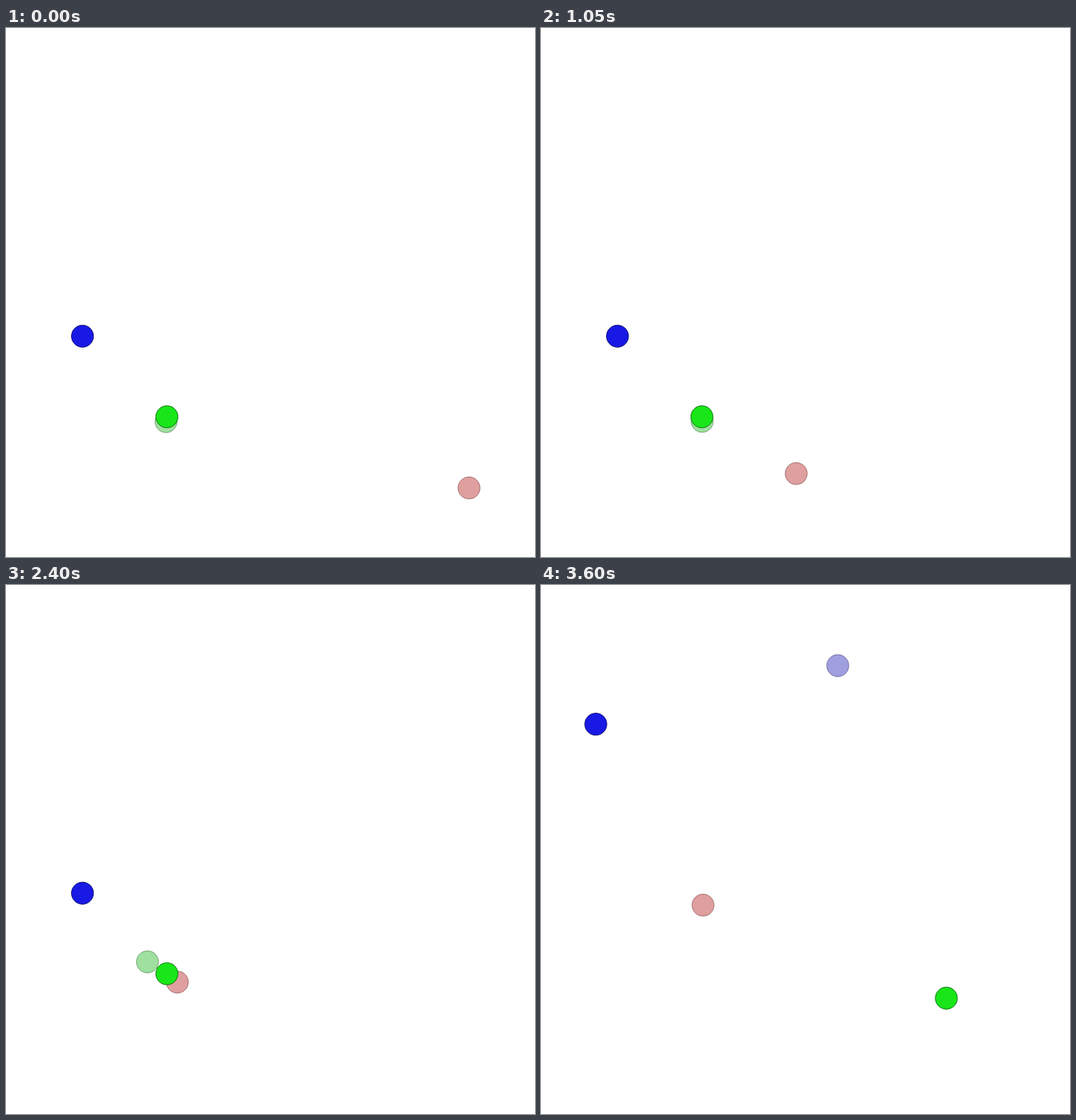
An HTML page that plays this animation: 700 px wide and 700 px high, repeating every 3.75 s.

```html
<!DOCTYPE html>
<html lang="en">
<head>
<meta charset="utf-8">
<title>Agents and landmarks</title>
<style>
  html, body { margin: 0; width: 100%; height: 100%; overflow: hidden; background: #fff; }
  svg { display: block; width: 100vw; height: 100vh; }
  .agent { fill-opacity: .5; stroke-opacity: .5; }
</style>
</head>
<body>
<svg id="stage" viewBox="0 0 700 700"></svg>
<script>
const STEP = 150, STEPS = 25, RADIUS = 14.58, SIDES = 30;
const HUES = { red: 0, green: 120, blue: 240 };

// Key points of the two paths: step, x, y.
const redKeys = [
  [0, 612.7, 608.6], [2, 553.7, 608.6], [5, 423.7, 606.5], [6, 374.7, 604.6],
  [7, 337.7, 589.6], [9, 265.4, 557.2], [11, 226.7, 527.6], [13, 225.2, 524.5],
  [15, 218.7, 523], [16, 226.7, 525.5], [17, 226.7, 532.5], [19, 212.5, 517.5],
  [21, 208.7, 511.7], [23, 213.7, 511.6]
];
const greenKeys = [
  [0, 211.8, 520.8], [4, 211.3, 513.8], [5, 211.4, 516.3], [9, 213.7, 522.8],
  [11, 205.2, 516.2], [13, 195.5, 505.7], [15, 200.5, 501], [16, 187.2, 498.7],
  [17, 186.7, 489.7], [19, 195.5, 499.5], [21, 196.7, 496.9], [23, 191, 498]
];

const slope = (a, b, axis) => (b[axis] - a[axis]) / (b[0] - a[0]);

// Smooth curve through the keys, with tangents taken from the neighbours.
function pointAt(keys, step) {
  const last = keys.length - 1;
  let i = 0;
  while (i < last - 1 && keys[i + 1][0] <= step) i++;
  const a = keys[i], b = keys[i + 1];
  const before = keys[Math.max(i - 1, 0)], after = keys[Math.min(i + 2, last)];
  const span = b[0] - a[0], t = (step - a[0]) / span, u = 1 - t;
  return [1, 2].map(axis => {
    const bendIn = slope(before, b, axis) * t * u * u;
    const bendOut = slope(a, after, axis) * t * t * u;
    return a[axis] * u * u * (1 + 2 * t) + b[axis] * t * t * (3 - 2 * t) + span * (bendIn - bendOut);
  });
}

const stage = document.getElementById("stage");
const outline = Array.from({ length: SIDES }, (_, i) => {
  const angle = 2 * Math.PI * i / SIDES;
  return [RADIUS * Math.cos(angle), RADIUS * Math.sin(angle)].map(v => v.toFixed(2)).join();
}).join(" ");

function addDot(color, isAgent) {
  const dot = document.createElementNS("http://www.w3.org/2000/svg", "polygon");
  const tone = `${HUES[color]}, ${isAgent ? 50 : 80}%`;
  dot.setAttribute("points", outline);
  dot.setAttribute("fill", `hsl(${tone}, 50%)`);
  dot.setAttribute("stroke", `hsl(${tone}, 25%)`);
  if (isAgent) dot.setAttribute("class", "agent");
  stage.appendChild(dot);
  return dot;
}

function place(dot, point) {
  dot.style.display = point ? "" : "none";
  if (point) dot.setAttribute("transform", `translate(${point})`);
}

const redAgent = addDot("red", true);
const greenAgent = addDot("green", true);
const blueAgent = addDot("blue", true);
const greenMark = addDot("green", false);
const blueMark = addDot("blue", false);

function draw(ms) {
  const step = Math.floor(ms / STEP) % STEPS;
  const reset = step === STEPS - 1;
  place(redAgent, reset ? [214.4, 423.6] : pointAt(redKeys, step));
  place(greenAgent, reset ? null : pointAt(greenKeys, step));
  place(blueAgent, reset ? [392.7, 106.7] : null);
  place(greenMark, reset ? [536.4, 546.7] : [212.9, 514.4]);
  place(blueMark, reset ? [72.5, 184.2] : [101.2, 407.8]);
}

const start = performance.now();
function tick() {
  draw(performance.now() - start);
  requestAnimationFrame(tick);
}
tick();
</script>
</body>
</html>
```
